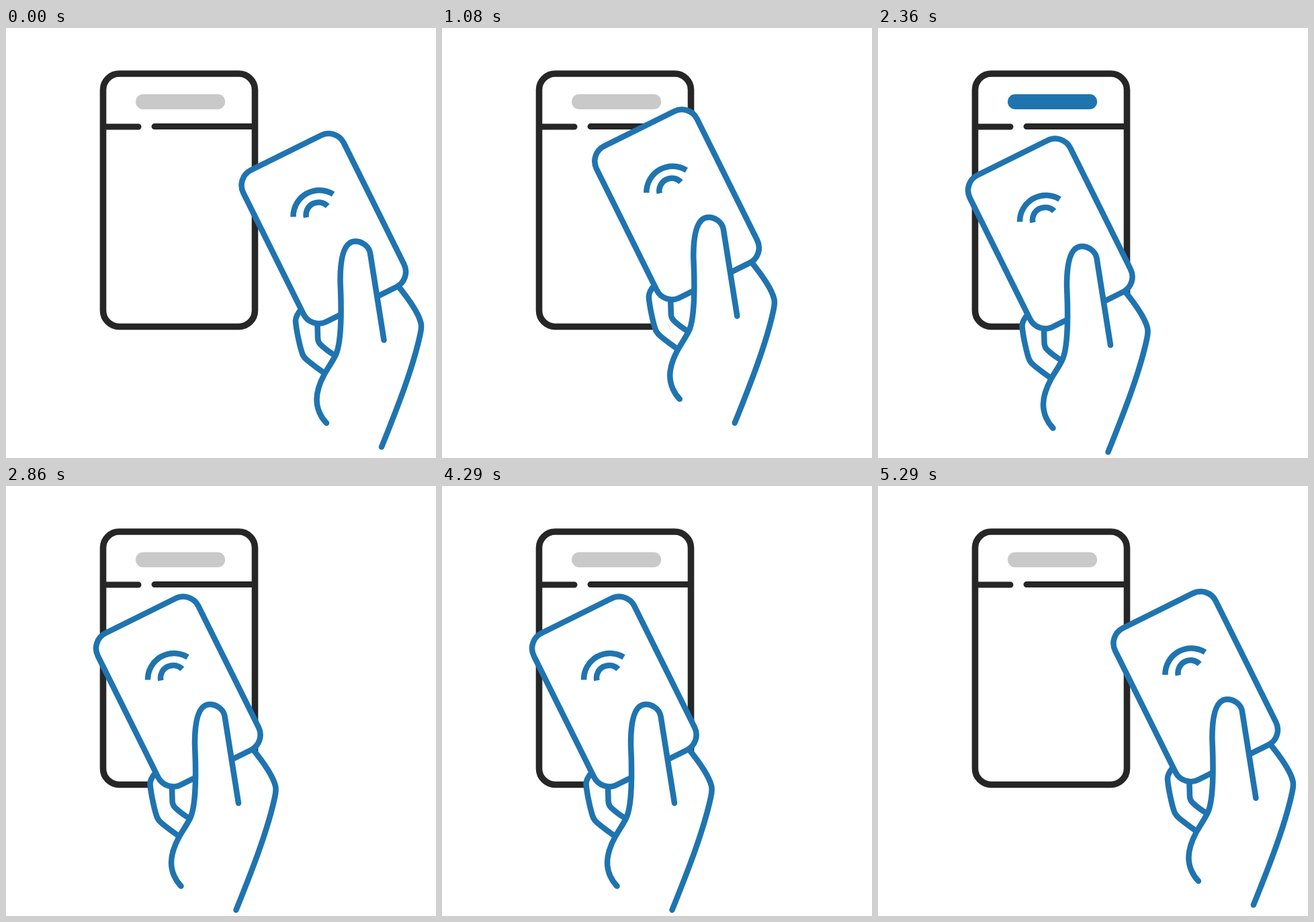
Recreate the animation shown at these times as an HTML page. Size 640 by 640 pixels, loop 8000 ms.

```html
<!DOCTYPE html>
<html lang="en">
<head>
<meta charset="utf-8">
<title>Card at reader</title>
<style>
html, body { margin: 0; width: 100%; height: 100%; overflow: hidden; background: #fff }
svg { display: block; width: 100vw; height: 100vh }
.line { fill: none }
</style>
</head>
<body>
<svg viewBox="0 0 640 640">
  <g fill="none" stroke="#262626" stroke-width="9" stroke-linecap="round">
    <rect x="144.5" y="68" width="226" height="376.5" rx="24" stroke-width="9.6"/>
    <path d="M146 147H197M221 146.6H369"/>
  </g>
  <rect id="bar" x="193" y="98.5" width="133.2" height="22.6" rx="11.3"/>
  <g id="hand" fill="#fff" stroke="#1f74b0" stroke-width="8.5" stroke-linecap="round" stroke-linejoin="round">
    <path stroke="none" d="M440 420L500 400 582 385 616 445 559 624 477 588 474 515z"/>
    <path d="M582 382C600 404 614 424 617.500 439Q619 445 616.500 456C606 505 583 564 559 623.500"/>
    <path d="M440 418Q431 428 431 436C432 450 438 478 442 487Q444 491 449 495Q460 504 473 513"/>
    <path class="line" d="M463.500 441L464 460Q464 467 468 471Q476 479 489 487"/>
    <rect x="-83.500" y="-126" width="167" height="252" rx="25.200" transform="translate(472.800 298.500) rotate(-26.400)"/>
    <path class="line" stroke-linecap="butt" d="M427.500 281A39 39 0 0 1 487 247.300M446.900 282A18.800 18.800 0 0 1 478.700 265"/>
    <path d="M562.500 464.500L542 335C540 324 529 317.500 520 317.500C505 317.500 497.500 336 497.500 375C497.800 390 499 400 498.500 430C498 455 496 476 490.500 487C485 498 479 506 474 515C467 528 462.500 541 462.500 553C462.500 567 469 580 477 588"/>
  </g>
</svg>
<script>
const LOOP = 8000, FPS = 14;
const bar = document.getElementById('bar'), hand = document.getElementById('hand');
const route = document.createElementNS('http://www.w3.org/2000/svg', 'path');
route.setAttribute('d', 'M0 0C-72.2 -31.8 -144.3 -64.7 -216.5 7.5');
const routeLength = route.getTotalLength();
const GREY = [201, 201, 201], BLUE = [31, 116, 176];

const ramp = (t, from, to) => Math.min(1, Math.max(0, (t - from) / (to - from)));

// cubic-bezier(.42, 0, .58, 1), solved by bisection
function ease(x) {
  if (x <= 0 || x >= 1) return x;
  let lo = 0, hi = 1, s;
  for (let i = 0; i < 24; i++) {
    s = (lo + hi) / 2;
    const bx = 1.26 * s * (1 - s) ** 2 + 1.74 * s * s * (1 - s) + s ** 3;
    if (bx < x) lo = s; else hi = s;
  }
  return s * s * (3 - 2 * s);
}

function draw(t) {
  const along = ease(ramp(t, 479, 1598)) - ease(ramp(t, 4300, 5300));
  const p = route.getPointAtLength(along * routeLength);
  hand.setAttribute('transform', `translate(${p.x} ${p.y})`);

  const glow = ramp(t, 2010, 2340) - ramp(t, 2470, 2810)
             + ramp(t, 2940, 3270) - ramp(t, 3420, 3750);
  bar.setAttribute('fill', `rgb(${GREY.map((g, i) => Math.round(g + (BLUE[i] - g) * glow))})`);
}

function tick() {
  const t = performance.now() % LOOP;
  draw(Math.floor(t * FPS / 1000) * 1000 / FPS);
  requestAnimationFrame(tick);
}
tick();
</script>
</body>
</html>
```
